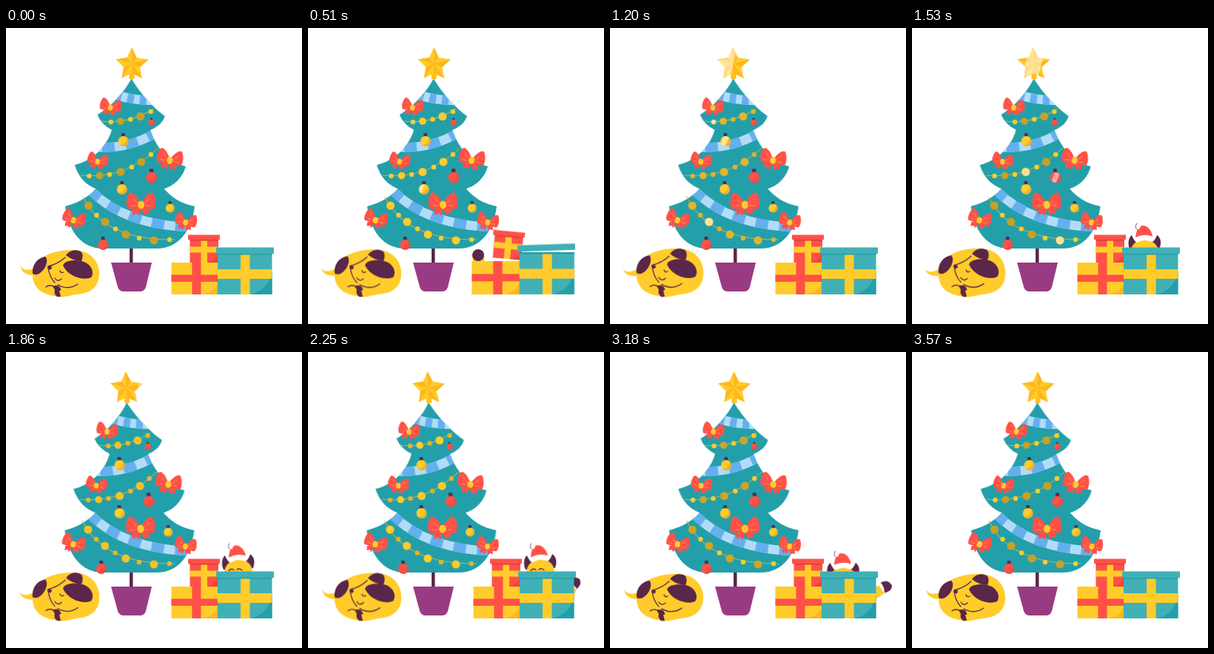
An HTML page without scripts for the animation above (3.6 s loop, 400 px wide and 400 px high).

```html
<!DOCTYPE html>
<html lang="en">
<head>
<meta charset="utf-8">
<title>Christmas tree</title>
<style>
html, body { margin: 0; width: 100%; height: 100%; overflow: hidden; background: #fff; }
svg { display: block; width: 100vw; height: 100vh; }
svg * { animation-duration: 3.6s; animation-iteration-count: infinite; }
.teal { fill: #239faa; }
.gold { fill: #ffcc2b; }
.red { fill: #ff5148; }
.plum { fill: #5a2649; }
.line { fill: none; stroke: #5a2649; stroke-width: 1.3; stroke-linecap: round; }
.band { fill: none; stroke: #b1dcf8; stroke-width: 12.5; }
.dash { stroke: #64afee; stroke-dasharray: 17 15; }
.wire { fill: none; stroke: #d5ad2c; stroke-width: 1; }

/* Tree: nested skews bend the trunk progressively towards the tip. */
.sway, .swing { animation-timing-function: cubic-bezier(.37,0,.63,1); animation-delay: -3.3s; }
.sway { animation-name: sway; }
.swing { animation-name: swing; }
@keyframes sway { 50% { transform: skewX(var(--bend)); } }
@keyframes swing { 50% { transform: translateX(-2.7px); } }

.big { animation-name: big; }
.small { animation-name: small; }
@keyframes big {
  0%, 42.5%, 100% { fill: #c6a127; }
  14%, 62% { fill: #ffcc2b; }
  33%, 78% { fill: #e3b62a; }
}
@keyframes small {
  0%, 14%, 42.5%, 78%, 100% { fill: #ffcc2b; }
  33%, 62% { fill: #e0b329; }
}
.glow, .sheen { animation-delay: calc(var(--t) - 1.8s); }
.glow { fill: #ffe29a; animation-name: glow; }
.sheen, .shine { fill: #fff; opacity: .5; animation-timing-function: linear; }
.sheen { animation-name: sheen; }
.shine { animation-name: shine; }
@keyframes glow { 0%, 44%, 56%, 100% { opacity: 0; } 50% { opacity: 1; } }
@keyframes sheen {
  0%, 43% { transform: translateX(-20px); }
  57%, 100% { transform: translateX(20px); }
}
@keyframes shine {
  0%, 22% { transform: translateX(-40px); }
  33% { transform: translateX(-11px); }
  42.5% { transform: none; }
  56%, 100% { transform: translateX(40px); }
}

/* Sleeping dog */
.breath { transform-origin: 81px 363px; animation-name: breath; animation-timing-function: ease-in-out; }
@keyframes breath { 38% { transform: scale(1.005,1.035); } }
.wag { transform-origin: 40px 331px; animation-name: wag; animation-timing-function: ease-in-out; }
@keyframes wag {
  14% { transform: rotate(-9deg); }
  32%, 43% { transform: rotate(-12deg); }
  62% { transform: none; }
}

/* Presents */
.low { transform-origin: 287px 360px; animation-name: low; }
.top { transform-origin: 268px 317px; animation-name: top; }
.wide { transform-origin: 323px 360px; animation-name: wide; }
.lid { transform-origin: 323px 301px; animation-name: lid; }
@keyframes low { 0%, 5%, 28%, 100% { transform: none; } 14% { transform: scale(1.035,1.045); } 21% { transform: scale(.99,1.01); } }
@keyframes top { 0%, 5%, 30%, 100% { transform: none; } 14% { transform: translate(1px,-5px) rotate(5.5deg); } 22% { transform: translateY(-3px) rotate(-4deg); } }
@keyframes wide { 0%, 6%, 30%, 100% { transform: none; } 14% { transform: scale(1.01,1.02); } 22% { transform: scale(1.01,.99); } }
@keyframes lid { 0%, 6%, 30%, 100% { transform: none; } 14% { transform: translate(-1px,-4px) rotate(-2deg); } 22% { transform: translateY(-5px) rotate(2.5deg); } }

/* Hidden dog */
.peek { animation-name: peek; }
.head { animation-name: head; transform-origin: 314px 296px; }
.tail { animation-name: tail; transform-origin: 350px 332px; }
@keyframes peek { 0%, 6%, 23%, 100% { transform: translate(8px,24px); } 13%, 16% { transform: none; } }
@keyframes head {
  0%, 35% { transform: translateY(46px); }
  41%, 44% { transform: translateY(6px); }
  54%, 63% { transform: rotate(-3deg); }
  70% { transform: rotate(3deg); }
  78%, 87% { transform: translate(1px,-3px); }
  94%, 100% { transform: translateY(46px); }
}
@keyframes tail {
  0%, 60% { transform: translate(-22px,12px) rotate(-40deg); }
  62.5% { transform: translate(-3px,6px) rotate(-31deg); }
  67%, 78.3% { transform: none; }
  72.5%, 84% { transform: rotate(-22deg); }
  88% { transform: rotate(2deg); }
  92%, 100% { transform: translate(-22px,12px) rotate(-40deg); }
}
</style>
</head>
<body>
<svg viewBox="0 0 400 400">
<defs>
  <path id="tier3" d="M124 214C116 225 100 236 80 241C84 274 102 298 131 298H204C233 298 251 274 255 241C236 237 223 229 211 214Z"/>
  <path id="tier2" d="M144 134C139 158 117 180 93 185C98 202 108 212 123 218H212C228 213 239 202 243 187C219 181 202 161 194 134Z"/>
  <path id="tier1" d="M170 68C163 82 145 105 124 117C127 126 134 133 144 138H195C205 134 212 128 215 119C196 105 178 83 170 68Z"/>
  <path id="star" d="M170.500 26L177 40L193 42.500L181.500 53L184.500 68L170.500 61L157 68L159.500 53L149 42.500L164 40Z"/>
  <clipPath id="clip3"><use href="#tier3"/></clipPath>
  <clipPath id="clip2"><use href="#tier2"/></clipPath>
  <clipPath id="clip1"><use href="#tier1"/></clipPath>
  <clipPath id="clipStar"><use href="#star"/></clipPath>
  <clipPath id="round"><circle r="7"/></clipPath>
  <clipPath id="ground"><path d="M0 0H400V358H0Z"/></clipPath>
  <g id="bow">
    <path class="red" d="M-3 2L-12 8L-11 15L-6 12.500L-3 16L0 6L4 15L7 12L12 13L11 7L3 2Z"/>
    <path class="red" d="M0 0C-5-11-12-17-16-15C-20-9-21 1-18 6C-13 8-6 6 0 0C6 6 13 8 18 6C21 1 20-9 16-15C12-17 5-11 0 0Z"/>
    <path d="M-6-2L-12-8M-7 2L-14 2M6-2L12-8M7 2L14 2" stroke="#ffad3b" stroke-width=".8"/>
    <ellipse class="gold" cy="1" rx="4.600" ry="5.400"/>
  </g>
  <g id="ball">
    <path class="plum" d="M-2.500-11H2L2.500-5H-2.500Z"/>
    <circle r="7"/>
    <path d="M5-5A7 7 0 0 1-5 5Q4 5 5-5Z" fill="#a3371e" opacity=".18"/>
  </g>
  <circle id="L" r="5.500"/>
  <circle id="M" r="4.800"/>
  <circle id="S" r="3.200"/>
</defs>

<path class="plum" d="M167 296H171.500V318H167Z"/>
<path d="M142 317H197L189 350Q187 356 181 356H159Q153 356 151 350Z" fill="#993b83"/>

<g class="sway" style="--bend:.62deg;transform-origin:170px 298px">
  <use href="#tier3" class="teal"/>
  <g clip-path="url(#clip3)">
    <path class="band" d="M115 220Q160 266 248 269"/>
    <path class="band dash" stroke-dashoffset="2" d="M115 220Q160 266 248 269"/>
  </g>
  <path class="wire" d="M104 228Q132 287 228 286"/>
  <use href="#L" class="big" x="111.500" y="240"/><use href="#S" class="small" x="122.500" y="253"/>
  <use href="#L" class="big" x="134" y="262"/><use href="#S" class="small" x="148" y="271.500"/>
  <use href="#L" class="big" x="162" y="279"/><use href="#S" class="small" x="180" y="284"/>
  <use href="#L" class="big" x="200" y="287"/><use href="#S" class="small" x="221" y="286"/>
  <use href="#L" class="glow" style="--t:1.2s" x="134" y="262"/>
  <use href="#L" class="glow" style="--t:1.53s" x="200" y="287"/>
  <use href="#bow" transform="translate(182.500 238)"/>
  <use href="#bow" transform="translate(91.500 259) rotate(18) scale(.8)"/>
  <use href="#bow" transform="translate(243 262) rotate(12) scale(.75)"/>
  <g transform="translate(222 243.500) scale(.86)"><use href="#ball" class="swing gold"/></g>
  <g transform="translate(131.500 293)"><use href="#ball" class="swing red"/></g>

  <g class="sway" style="--bend:1.2deg;transform-origin:170px 217px">
    <use href="#tier2" class="teal"/>
    <g clip-path="url(#clip2)">
      <path class="band" d="M122 161Q166 164 204 141"/>
      <path class="band dash" stroke-dashoffset="-8" d="M122 161Q166 164 204 141"/>
    </g>
    <path class="wire" d="M101 199Q160 205 206 162"/>
    <use href="#S" class="small" x="112.500" y="200"/><use href="#M" class="big" x="126.500" y="199.500"/>
    <use href="#S" class="small" x="140" y="198"/><use href="#L" class="big" x="155" y="194.500"/>
    <use href="#S" class="small" x="170" y="188"/><use href="#L" class="big" x="183" y="181"/>
    <use href="#S" class="small" x="196" y="171"/>
    <use href="#L" class="glow" style="--t:1.53s" x="155" y="194.500"/>
    <use href="#bow" transform="translate(124 180) rotate(12) scale(.72)"/>
    <use href="#bow" transform="translate(221.500 178) rotate(10) scale(.9)"/>
    <g transform="translate(159 153)"><g class="swing">
      <use href="#ball" class="gold"/>
      <g clip-path="url(#round)"><path class="sheen" style="--t:1.22s" d="M0-9H7L0 9H-7Z"/></g>
    </g></g>
    <g transform="translate(197 202)"><g class="swing">
      <use href="#ball" class="red" transform="scale(1.06)"/>
      <g clip-path="url(#round)"><path class="sheen" style="--t:1.53s" d="M0-9H7L0 9H-7Z"/></g>
    </g></g>
    <g transform="translate(157 218)"><g class="swing">
      <use href="#ball" class="gold"/>
      <g clip-path="url(#round)"><path class="sheen" style="--t:.58s" d="M0-9H7L0 9H-7Z"/></g>
    </g></g>

    <g class="sway" style="--bend:1.2deg;transform-origin:170px 137px">
      <use href="#tier1" class="teal"/>
      <g clip-path="url(#clip1)">
        <path class="band" d="M148 90Q172 98 200 98"/>
        <path class="band dash" style="stroke-dasharray:9 8" d="M148 90Q172 98 200 98"/>
      </g>
      <path class="wire" d="M129 126Q167 130 200 109"/>
      <use href="#S" class="small" x="142" y="127"/><use href="#M" class="big" x="155" y="126"/>
      <use href="#S" class="small" x="168.500" y="123.500"/><use href="#L" class="big" x="182" y="119.500"/>
      <use href="#S" class="small" x="196" y="113"/>
      <use href="#S" class="glow" style="--t:1.2s" x="142" y="127"/>
      <use href="#bow" transform="translate(141.500 107) rotate(10) scale(.74)"/>
      <g transform="translate(197 128) scale(.58)"><use href="#ball" class="swing red"/></g>
      <path d="M167 58H174V69H167Z" fill="#ffc022"/>
      <use href="#star" class="gold"/>
      <path d="M170.500 26L177 40L170.500 48ZM193 42.500L181.500 53L170.500 48ZM184.500 68L170.500 61V48ZM157 68L159.500 53L170.500 48ZM149 42.500L164 40L170.500 48Z" fill="#ffb51d"/>
      <g clip-path="url(#clipStar)"><path class="shine" d="M166 24H188L175 70H153Z"/></g>
    </g>
  </g>
</g>

<path class="gold wag" d="M19 320.500C22 328 30 328 40 324L42 334C28 335 20 330 19 320.500Z"/>
<g class="breath">
  <path class="gold" d="M36 334C37 310 62 300 90 300C114 300 126 315 126 332C126 350 114 359 95 360C87 361 78 365 71 363C50 361 36 352 36 334Z"/>
  <path class="plum" d="M36 332C35 321 41 311 53 309C58 313 54 326 46 331Q41 335 36 332Z"/>
  <path class="plum" d="M81 307C86 300 96 298 102 303Q105 308 102 315Q91 315 81 307Z"/>
  <path class="line" d="M80 310Q70 319 57 322Q58 336 66 344"/>
  <path class="plum" d="M77 321C79 314 92 313 102 315C115 318 120 330 115 337C105 342 84 336 77 321Z"/>
  <ellipse class="plum" cx="59" cy="324" rx="2.800" ry="2.400"/>
  <path class="line" d="M73 328Q74 332 78 330M66 338Q70 344 75 339"/>
  <path class="line" d="M54 350Q59 346 66 350M97 346Q84 355 70 347"/>
  <path class="plum" d="M63 349Q72 346 74 353L77 361Q74 364 69 363Q64 359 66 354Z"/>
  <path class="gold" d="M72 355Q82 352 82 358Q81 363 74 363Z"/>
</g>

<g clip-path="url(#ground)">
  <g class="peek">
    <path class="gold" d="M222 308H238L240 345H226Z"/>
    <circle class="plum" cx="230" cy="307" r="8"/>
  </g>
  <g class="tail">
    <path d="M348 334L369 320" fill="none" stroke="#ffcc2b" stroke-width="13"/>
    <path class="plum" d="M368 311Q378 306 383 315Q384 323 373 325Q373 317 368 311Z"/>
  </g>
  <g class="head">
    <path class="plum" d="M294 293C291 284 293 277 297 274Q299 281 305 284L302 293ZM334 293C338 284 336 277 331 274Q329 281 323 284L326 293Z"/>
    <path class="gold" d="M295 340V297Q297 281 314 281Q332 281 333 297V340Z"/>
    <path class="line" d="M301 295Q304 291 308 294M312 294Q315 291 319 295"/>
    <path class="red" d="M302 281C302 269 305 261 313 261Q324 263 326 281Z"/>
    <circle cx="304.500" cy="262" r="4" fill="#fff"/>
    <path class="line" style="stroke-width:.8" d="M304 266Q300 263 304 258"/>
    <path d="M304 280Q314 275 324 279" fill="none" stroke="#fff" stroke-width="7" stroke-linecap="round"/>
  </g>
</g>

<g class="low">
  <path class="gold" d="M223.500 317H287V360H223.500Z"/>
  <path d="M287 343V360H264Q283 357 287 343Z" fill="#ffb51d"/>
  <path class="red" d="M251.500 317H263.500V360H251.500ZM223.500 333.500H287V343H223.500Z"/>
</g>
<g class="top">
  <path class="red" d="M248.500 285H287V317H248.500Z"/>
  <path d="M287 303V317H272Q284 314 287 303Z" fill="#e9443e"/>
  <path class="gold" d="M263.500 286H272V317H263.500ZM248.500 295.500H287V303.500H248.500Z"/>
  <path class="red" d="M246 279.500H289V286H246Z"/>
  <path d="M248.500 286H287V287.500H248.500Z" fill="#d93f3b"/>
</g>
<g class="wide">
  <path d="M286 304H359.500V360H286Z" fill="#40b0b6"/>
  <path d="M359.500 328V360H331Q355 354 359.500 328Z" fill="#239faa"/>
  <path class="gold" d="M317 305H329.500V360H317ZM286 326H359.500V339H286Z"/>
  <path d="M286 304H359.500V306.500H286Z" fill="#239faa"/>
</g>
<path class="lid" d="M284 296.500H362V305H284Z" fill="#40b0b6"/>
</svg>
</body>
</html>
```
